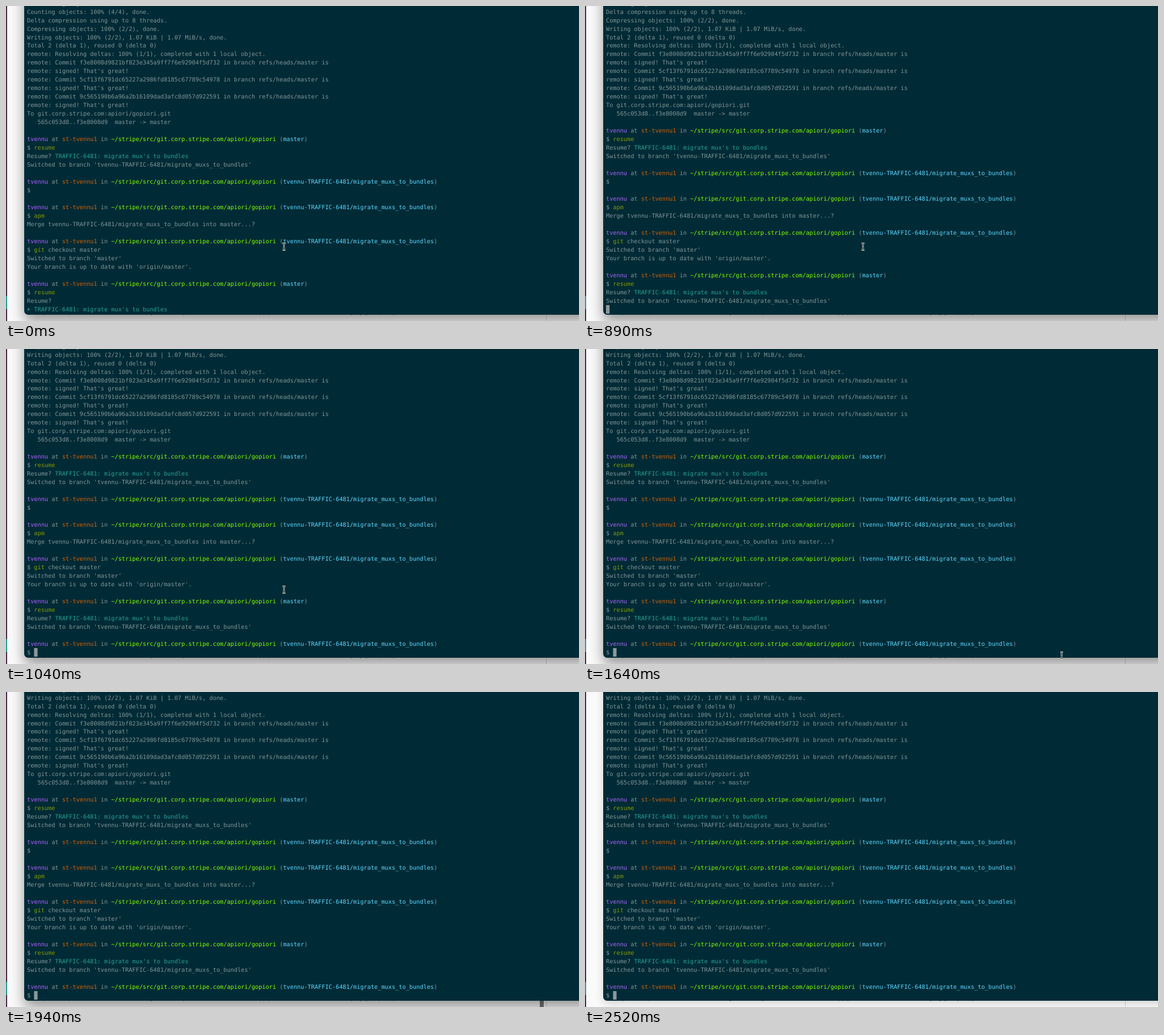
An HTML page with a canvas for the animation above (2.62 s loop, 1008 by 555 pixels).

```html
<!DOCTYPE html>
<html lang="en">
<head>
<meta charset="utf-8">
<title>Terminal session</title>
<style>
  html, body { margin: 0; width: 100%; height: 100%; overflow: hidden; background: #fafafa; }
  canvas { display: block; width: 1008px; height: 555px; }
</style>
</head>
<body>
<canvas id="stage" width="1008" height="555"></canvas>
<script>
const ctx = document.getElementById('stage').getContext('2d');
const W = 1008, H = 555, LOOP = 2620;

// Terminal grid, measured up from the last row; cells are 7:17
const LEFT = 37, CELL = 6.17, ROW = CELL * 17 / 7, LAST = 36;
const LAST_TOP = 527, LAST_BASE = 538;
const EDGE = 32, BOTTOM = 544;
const FONT = '10.25px "DejaVu Sans Mono", monospace';

const GREY = '#839496', TEAL = '#2aa198', OLIVE = '#859900', PURPLE = '#af5fff',
      ORANGE = '#d75f00', LIME = '#87ff00', SKY = '#5fd7ff', BACK = '#002b36';

const USER = 'tvennu';
const TASK = "TRAFFIC-6481: migrate mux's to bundles";
const BRANCH = USER + '-TRAFFIC-6481/migrate_muxs_to_bundles';

const plain = text => [[GREY, text]];
const prompt = branch => [
  [PURPLE, USER], [GREY, ' at '], [ORANGE, 'st-' + USER + '1'], [GREY, ' in '],
  [LIME, '~/stripe/src/git.corp.stripe.com/apiori/gopiori'],
  [GREY, ' ('], [SKY, branch], [GREY, ')']
];
const command = (name, args = '') => [[GREY, '$ '], [OLIVE, name], [GREY, args]];
const commit = hash => [
  plain('remote: Commit ' + hash + ' in branch refs/heads/master is'),
  plain("remote: signed! That's great!")
];
const resumed = [[GREY, 'Resume? '], [TEAL, TASK]];
const switched = plain("Switched to branch '" + BRANCH + "'");
const blank = [];

const history = [
  plain('Enumerating objects: 4, done.'),
  plain('Counting objects: 100% (4/4), done.'),
  plain('Delta compression using up to 8 threads.'),
  plain('Compressing objects: 100% (2/2), done.'),
  plain('Writing objects: 100% (2/2), 1.07 KiB | 1.07 MiB/s, done.'),
  plain('Total 2 (delta 1), reused 0 (delta 0)'),
  plain('remote: Resolving deltas: 100% (1/1), completed with 1 local object.'),
  ...commit('f3e8008d9821bf823e345a9ff7f6e92904f5d732'),
  ...commit('5cf13f6791dc65227a2986fd8185c67789c54978'),
  ...commit('9c565190b6a96a2b16109dad3afc8d057d922591'),
  plain('To git.corp.stripe.com:apiori/gopiori.git'),
  plain('   565c053d8..f3e8008d9  master -> master'),
  blank, prompt('master'), command('resume'), resumed, switched,
  blank, prompt(BRANCH), plain('$'),
  blank, prompt(BRANCH), command('apm'),
  plain('Merge ' + BRANCH + ' into master...?'),
  blank, prompt(BRANCH), command('git', ' checkout master'),
  plain("Switched to branch 'master'"),
  plain("Your branch is up to date with 'origin/master'."),
  blank, prompt('master'), command('resume')
];

// Output after the last command; caret is its column on the last row
const stages = [
  { at: 0, add: [plain('Resume?'), [[GREY, '  '], [TEAL, TASK]]], caret: -1 },
  { at: 740, add: [resumed, blank], caret: 0 },
  { at: 890, add: [resumed, switched, blank], caret: 0 },
  { at: 1040, add: [resumed, switched, blank, prompt(BRANCH), plain('$ ')], caret: 2 }
];

const pointer = [
  { at: 0, x: 489, y: 424 },
  { at: 1340, x: 512, y: 410 },
  { at: 1490, x: 738.5, y: 431 },
  { at: 1640, x: 838.5, y: 540 },
  { at: 1940, x: -50, y: -50 }
];

const current = (steps, t) => steps.filter(s => s.at <= t).pop();

function rect(color, x, y, w, h) {
  ctx.fillStyle = color;
  ctx.fillRect(x, y, w, h);
}

function drawDesktop(t) {
  rect('#fafafa', 0, 0, W, H);
  rect('#4a2b48', 0, 0, 2, H);
  rect('#2a9d92', 0, 511, 2, 23);
  rect('#cfcfcf', 950, BOTTOM, 1, H - BOTTOM);
  if (t >= 1940 && t < 2520) rect('#777', 939, BOTTOM, 7, H - BOTTOM);
  ctx.font = '12px "Liberation Sans", sans-serif';
  ctx.fillStyle = '#444';
  ctx.fillText('yes, keep the older handlers running until every mux has moved, then apply the new bundle to the staging group only', 65, 542);
}

function drawWindow(focused) {
  ctx.save();
  ctx.shadowColor = focused ? 'rgba(0,0,0,0.4)' : 'rgba(0,0,0,0.16)';
  ctx.shadowBlur = focused ? 25 : 16;
  ctx.shadowOffsetY = focused ? 12 : 5;
  ctx.fillStyle = BACK;
  ctx.beginPath();
  ctx.roundRect(EDGE, -100, W + 100, BOTTOM + 100, 7);
  ctx.fill();
  ctx.restore();
}

function drawLine(parts, y) {
  let col = 0;
  for (const [color, text] of parts) {
    ctx.fillStyle = color;
    for (const ch of text) {
      if (ch !== ' ') ctx.fillText(ch, LEFT + col * CELL, y);
      col++;
    }
  }
}

function drawTerminal(t) {
  const { add, caret } = current(stages, t);
  const lines = history.concat(add).slice(-LAST - 1);
  ctx.font = FONT;
  ctx.textRendering = 'geometricPrecision';
  lines.forEach((line, i) => drawLine(line, LAST_BASE - (LAST - i) * ROW));
  if (caret >= 0) {
    rect('#8a999b', LEFT + caret * CELL, LAST_TOP, CELL, 15);
  } else {
    ctx.fillStyle = TEAL;
    ctx.beginPath();
    ctx.moveTo(38.5, LAST_TOP + 5);
    ctx.lineTo(42, LAST_TOP + 7.5);
    ctx.lineTo(38.5, LAST_TOP + 10);
    ctx.fill();
  }
}

function drawBeam({ x, y }) {
  ctx.beginPath();
  ctx.moveTo(x - 2.5, y - 6);
  ctx.quadraticCurveTo(x, y - 6, x, y - 4);
  ctx.quadraticCurveTo(x, y - 6, x + 2.5, y - 6);
  ctx.moveTo(x, y - 4);
  ctx.lineTo(x, y + 4);
  ctx.moveTo(x - 2.5, y + 6);
  ctx.quadraticCurveTo(x, y + 6, x, y + 4);
  ctx.quadraticCurveTo(x, y + 6, x + 2.5, y + 6);
  ctx.moveTo(x - 1.5, y + 2.5);
  ctx.lineTo(x + 1.5, y + 2.5);
  for (const [color, width] of [['#eee', 2.4], ['#111', 0.9]]) {
    ctx.strokeStyle = color;
    ctx.lineWidth = width;
    ctx.stroke();
  }
}

function drawArrowTip() {
  ctx.fillStyle = '#222';
  ctx.beginPath();
  ctx.moveTo(973.5, 551);
  ctx.lineTo(977, 555);
  ctx.lineTo(973.5, 555);
  ctx.fill();
}

function frame(now) {
  const t = now % LOOP;
  drawDesktop(t);
  drawWindow(t < 2520);
  drawTerminal(t);
  drawBeam(current(pointer, t));
  if (t >= 2090 && t < 2240) drawArrowTip();
}

let start;
function tick(now) {
  start ??= now;
  frame(now - start);
  requestAnimationFrame(tick);
}
frame(0);
requestAnimationFrame(tick);
</script>
</body>
</html>
```
